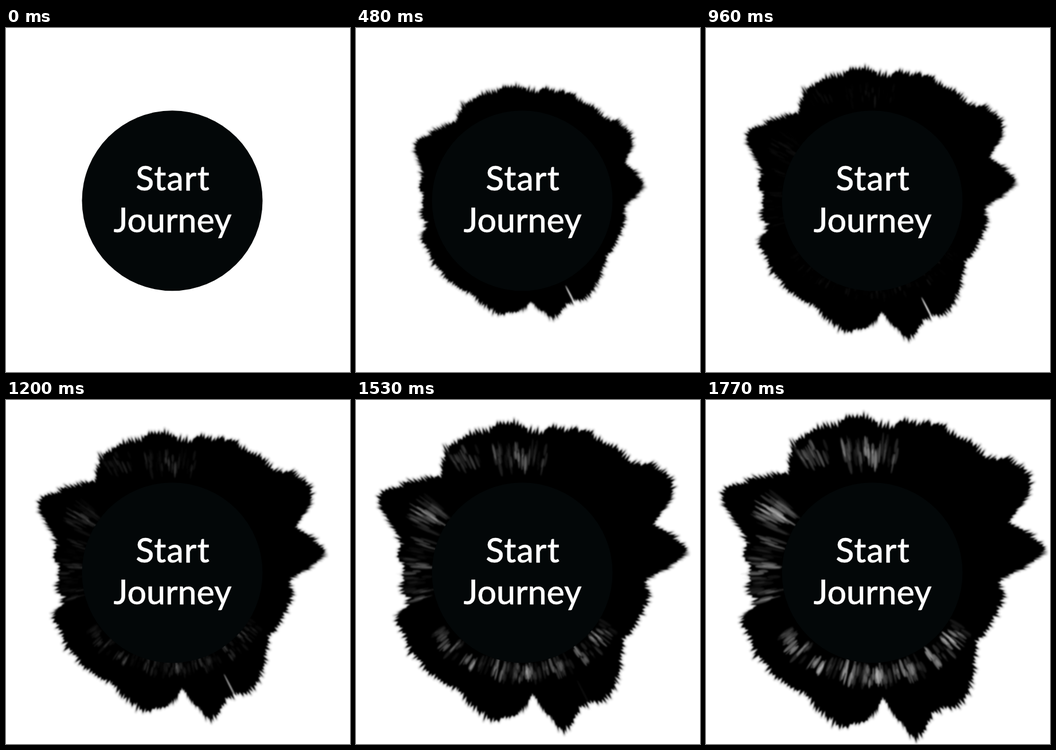
Animation, 600 px wide and 601 px high, one loop 1800 ms. Source, as an HTML page with a canvas:

```html
<!DOCTYPE html>
<html lang="en">
<head>
<meta charset="utf-8">
<title>Start Journey</title>
<style>
  html, body { margin: 0; width: 100%; height: 100%; overflow: hidden; background: #fff; }
  canvas, svg { position: absolute; left: 0; top: 0; width: 600px; height: 601px; }
  canvas { filter: blur(0.8px); }
  text {
    font: 500 59px Lato, "Open Sans", sans-serif;
    fill: #fff; stroke: #fff; stroke-width: 0.4; text-anchor: middle;
  }
  .wide { letter-spacing: 1px; }
</style>
</head>
<body>
<canvas id="ink" width="600" height="601"></canvas>
<svg viewBox="0 0 600 601">
  <circle cx="290" cy="301.7" r="157.5" fill="#030708"/>
  <text class="wide" x="291" y="284">Start</text>
  <text x="290.5" y="357">Journey</text>
</svg>
<script>
const LOOP = 1800, STEP = 30, LAST = LOOP - STEP;
const CX = 290, CY = 302, CORE = 145;
const ctx = document.getElementById('ink').getContext('2d');

// Tips and notches of the fully grown ink, clockwise from the upper left.
const corners = [
  [143, 130], [156, 66], [228, 40], [272, 27], [300, 44], [412, 44], [490, 98], [552, 115],
  [566, 155], [530, 212], [597, 262], [508, 318], [523, 345], [470, 427], [454, 515],
  [400, 547], [364, 594], [309, 519], [280, 562], [232, 566], [172, 520], [90, 450],
  [62, 380], [86, 361], [72, 285], [75, 250], [29, 175], [45, 150], [112, 132]
];

// Worn bands: angle, spread, inner radius, outer radius, streaks, strength.
const bands = [
  [88, 58, 162, 206, 150, 0.6],
  [182, 17, 162, 222, 44, 0.35],
  [211, 8, 165, 236, 30, 0.6],
  [244, 6, 208, 258, 18, 0.45],
  [269, 13, 185, 240, 44, 0.55]
];

let seed = 11;
const rand = () => (seed = (seed * 16807) % 2147483647) / 2147483647;
const mix = (a, b, p) => a + (b - a) * p;
const clamp = v => Math.max(0, Math.min(1, v));
const rad = deg => deg * Math.PI / 180;
const growth = t => (t / LAST) ** 0.64;
const grow = (r, t) => mix(CORE, r, growth(t));

// Ragged edge: short teeth gathered in tufts on slightly bulging sides.
const edge = [];
let tuft = 0;
corners.forEach(([x1, y1], i) => {
  const [x2, y2] = corners[(i + 1) % corners.length];
  const n = Math.max(2, Math.round(Math.hypot(x2 - x1, y2 - y1) / 6.5));
  const add = (k, offset) => {
    const p = k / n;
    const x = mix(x1, x2, p) - CX, y = mix(y1, y2, p) - CY;
    const bulge = 5 * Math.sin(Math.PI * p);
    edge.push({ angle: Math.atan2(y, x), r: Math.hypot(x, y) + bulge, offset });
  };
  for (let k = 0; k < n; k++) {
    if (rand() < 0.35) tuft = 7 * rand() - 4;
    add(k + 0.3 * rand(), tuft - 1 - 5 * rand());
    add(k + 0.35 + 0.6 * rand(), tuft + 1 + 7 * rand() ** 2);
  }
});

const streaks = bands.flatMap(([mid, spread, inner, outer, n, strength]) =>
  Array.from({ length: n }, () => {
    const turn = spread * (rand() * 2 - 1);
    const clump = 0.2 + 0.8 * Math.cos(rad(turn * 180 / 16)) ** 2;
    return {
      angle: rad(mid + turn),
      r: mix(inner, outer, 0.15 + 0.65 * rand()),
      len: (outer - inner) * (0.15 + 0.25 * rand()),
      width: 1.2 + 2.2 * rand(),
      start: 750 + 350 * rand(),
      strength: strength * clump * (0.5 + 0.6 * rand())
    };
  }));

function traceInk(t) {
  const size = mix(0.7, 1.15, t / LOOP);
  ctx.beginPath();
  for (const { angle, r, offset } of edge) {
    const d = grow(r, t) + offset * size;
    ctx.lineTo(CX + d * Math.cos(angle), CY + d * Math.sin(angle));
  }
  ctx.closePath();
}

function drawInk(t) {
  traceInk(t);
  ctx.lineJoin = 'round';
  for (const [width, alpha] of [[7, 0.06], [3, 0.14]]) {
    ctx.lineWidth = width;
    ctx.globalAlpha = alpha;
    ctx.stroke();
  }
  ctx.globalAlpha = 1;
  ctx.fillStyle = '#000';
  ctx.fill();
}

function drawStreak(angle, r, len, width, alpha) {
  ctx.globalAlpha = alpha;
  ctx.beginPath();
  ctx.ellipse(CX + r * Math.cos(angle), CY + r * Math.sin(angle), len, width, angle, 0, 2 * Math.PI);
  ctx.fill();
}

function drawWear(t) {
  ctx.fillStyle = '#fff';
  drawStreak(rad(63), grow(252, t), mix(22, 34, t / LOOP), 1.4, 0.9 * clamp((1560 - t) / 500));
  ctx.fillStyle = '#bdbdbd';
  const scale = mix(0.88, 1, clamp((t - 900) / (LAST - 900)));
  for (const s of streaks) {
    const p = clamp((t - s.start) / (LAST - s.start));
    if (p) drawStreak(s.angle, s.r * scale, s.len * mix(0.5, 1, p), s.width * mix(0.6, 1, p), s.strength * p);
  }
}

function draw(t) {
  ctx.clearRect(0, 0, 600, 601);
  if (!t) return;
  drawInk(t);
  drawWear(t);
}

function tick() {
  draw(Math.floor(performance.now() % LOOP / STEP) * STEP);
  requestAnimationFrame(tick);
}
tick();
</script>
</body>
</html>
```
